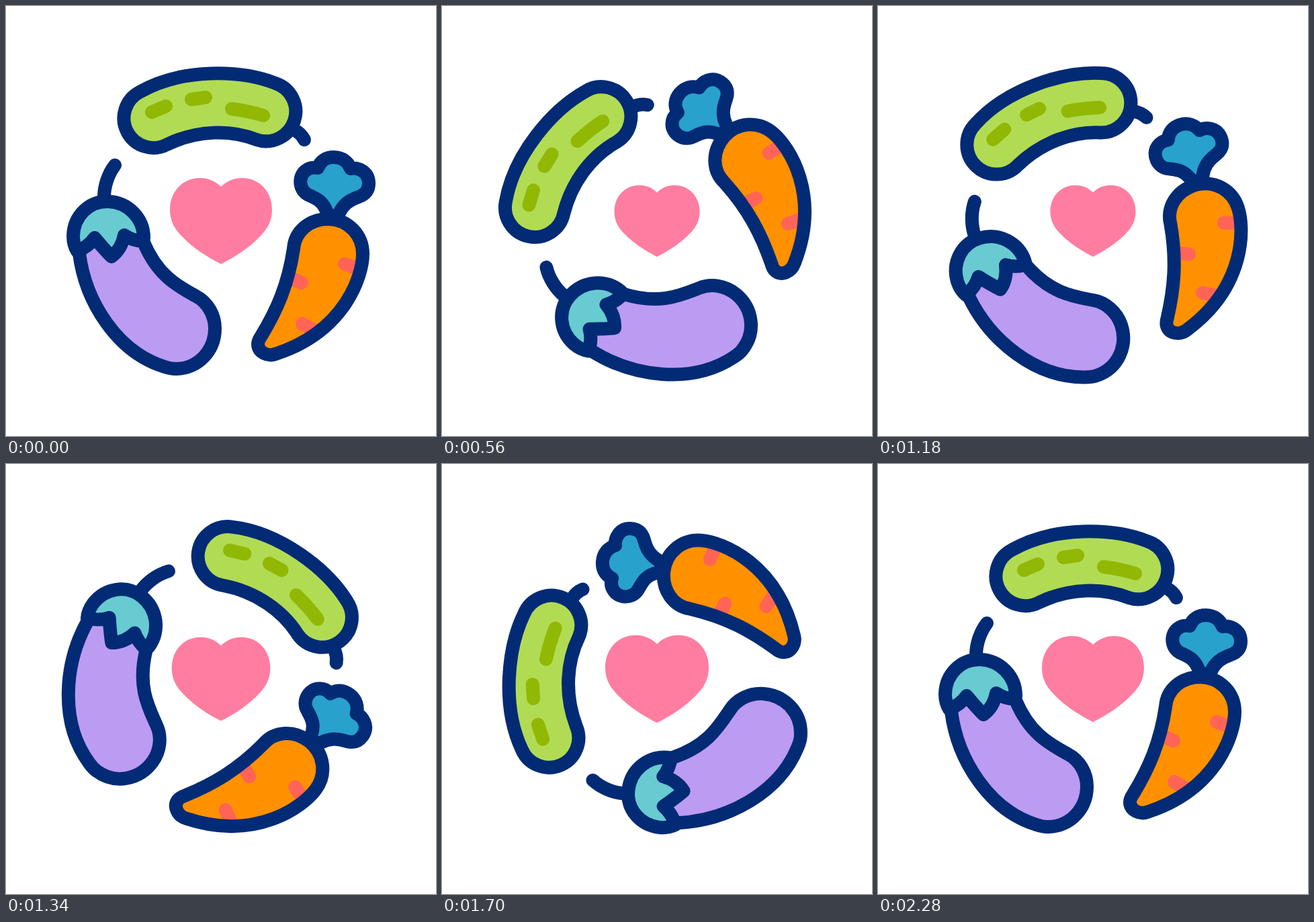
Write an HTML page that moves like this. It is 640 px wide and 640 px high and loops after 2.4 s.

```html
<!DOCTYPE html>
<html lang="en">
<head>
<meta charset="utf-8">
<title>Vegetables around a heart</title>
<style>
  html, body { margin: 0; height: 100%; overflow: hidden; background: #fff; }
  svg { display: block; width: 100vw; height: 100vh; }
  #veg { fill: none; stroke: #032b75; stroke-width: 20; stroke-linecap: round; stroke-linejoin: round; }
</style>
</head>
<body>
<svg viewBox="0 0 640 640">
  <defs>
    <path id="root" d="M428 361C430 335 452 317 480 317C510 318 531 341 531 369C531 400 506 484 401 518C390 522 375 516 375 503C375 498 378 494 380 491C403 453 420 415 428 361Z"/>
  </defs>
  <g id="veg">
    <!-- cucumber -->
    <path d="M428 184Q439 189 444 199"/>
    <path fill="#b2db54" d="M199 128C262 92 350 95 401 115A44 44 0 0 1 373 199C335 184 286 184 240 206A44 44 0 0 1 199 128Z"/>
    <path stroke="#91b805" d="M217 158L238 149M276 139L297 136M336 153Q360 156 383 163"/>

    <!-- carrot -->
    <path fill="#29a1cd" d="M487 316L478 308C472 290 462 287 452 282C436 276 434 254 446 245C452 240 459 240 464 241C468 230 477 225 488 225C500 225 509 232 513 242C522 240 540 245 540 264C540 276 533 281 525 284C510 289 502 296 496 308Z"/>
    <use href="#root" fill="#ff9100" stroke="none"/>
    <path stroke="#ff6456" d="M504 384L526 392M440 412L422 404M441 473L462 485"/>
    <use href="#root"/>

    <!-- eggplant -->
    <path d="M146 285C146 268 152 250 162 237"/>
    <path fill="#bc9bf3" d="M109 368C118 440 165 515 236 537C242 539 247 540 252 540C287 540 311 512 311 480C311 460 300 441 283 432C256 417 226 402 205 352L198 322L117 322Z"/>
    <path fill="#68cbd1" d="M106 365C101 357 100 348 100 342C101 312 124 290 152 291C182 292 205 316 205 345L204 350C196 350 185 347 176 341Q172 362 157 373Q145 361 132 345Q123 358 106 365Z"/>
  </g>
  <path id="heart" fill="#ff7da0" d="M320 269C311 260 300 256 289 256C262 256 244 277 244 303C244 321 252 333 262 343C278 360 300 374 320 384C340 374 362 360 378 343C388 333 396 321 396 303C396 277 378 256 351 256C340 256 329 260 320 269Z"/>
</svg>
<script>
  const veg = document.getElementById('veg');
  const heart = document.getElementById('heart');

  const LOOP = 2400;
  // [time, angle] and [time, width, height]
  const spin = [[0, 0], [776, -55.5], [2252, 360]];
  const beat = [[120, 1, 1], [570, .835, .83], [870, 1.06, 1.085], [1170, .835, .83], [1480, 1.06, 1.08], [1800, 1, 1]];

  const smooth = u => u * u * (3 - 2 * u);

  // cubic-bezier(.65, 0, .35, 1)
  function strongEase(x) {
    let lo = 0, hi = 1;
    for (let i = 0; i < 24; i++) {
      const u = (lo + hi) / 2, v = 1 - u;
      if (1.95 * u * v * v + 1.05 * u * u * v + u * u * u < x) lo = u;
      else hi = u;
    }
    return smooth(lo);
  }

  function sample(keys, t, ease) {
    const next = keys.findIndex(k => k[0] > t);
    if (next === 0) return keys[0].slice(1);
    if (next < 0) return keys[keys.length - 1].slice(1);
    const a = keys[next - 1], b = keys[next];
    const p = ease((t - a[0]) / (b[0] - a[0]));
    return a.slice(1).map((v, i) => v + (b[i + 1] - v) * p);
  }

  function draw(now) {
    const t = now % LOOP;
    const [angle] = sample(spin, t, strongEase);
    const [w, h] = sample(beat, t, smooth);
    veg.setAttribute('transform', `rotate(${angle} 320 320)`);
    heart.setAttribute('transform', `translate(320 320) scale(${w} ${h}) translate(-320 -320)`);
  }

  const start = performance.now();
  function tick() {
    draw(performance.now() - start);
    requestAnimationFrame(tick);
  }
  tick();
</script>
</body>
</html>
```
